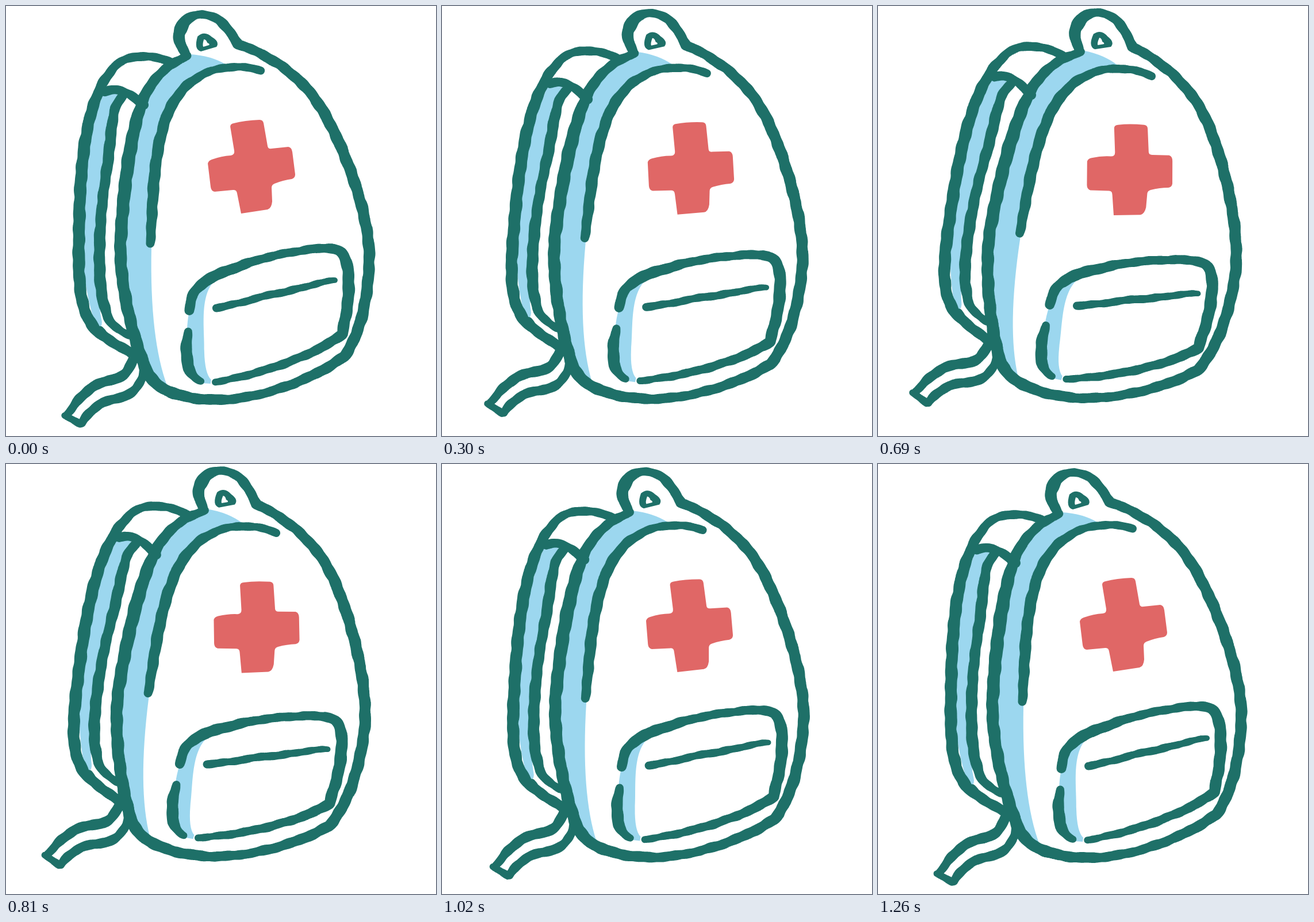
Write an HTML page with a canvas that moves like this. It is 748x748 px and loops after 1.29 s.

```html
<!DOCTYPE html>
<html lang="en">
<head>
<meta charset="utf-8">
<title>Swinging first-aid backpack</title>
<style>
  html, body { margin: 0; width: 100%; height: 100%; overflow: hidden; background: #fff; }
  canvas { display: block; }
</style>
</head>
<body>
<canvas id="stage" width="748" height="748"></canvas>
<script>
const ctx = document.getElementById('stage').getContext('2d');
const GREEN = '#1e7068', BLUE = '#9cd7ef', RED = '#e06766', WHITE = '#fff';
const LOOP = 1290, STEP = 30, SWING = 7.75 * Math.PI / 180;
const PIVOT_X = 386, PIVOT_Y = 370;

const ink = new Path2D();

// Inks a curve with a round brush; widths are spread evenly along it.
// Slow, unrelated waves in size and place give the hand-drawn edge.
function brush(curve, ...widths) {
  const line = document.createElementNS('http://www.w3.org/2000/svg', 'path');
  line.setAttribute('d', curve);
  const length = line.getTotalLength();
  for (let s = 0; s <= length; s += 1.2) {
    const at = s / length * (widths.length - 1);
    const i = Math.min(Math.floor(at), widths.length - 2);
    const width = widths[i] + (widths[i + 1] - widths[i]) * (at - i);
    const r = width / 2 + 0.4 * Math.sin(s * 0.13) * Math.sin(s * 0.031) + 0.3 * Math.sin(s * 0.29);
    const p = line.getPointAtLength(s);
    const x = p.x + 0.5 * Math.sin(s * 0.17), y = p.y + 0.5 * Math.cos(s * 0.11);
    ink.moveTo(x + r, y);
    ink.arc(x, y, r, 0, 2 * Math.PI);
  }
}

// Body, handle and front seam
brush(`M402,66 C450,82 500,112 535,158 S628,335 632,430 C632,500 618,570 588,610
  C540,645 450,684 370,685 C322,685 272,676 249,643 C228,600 198,500 199,415
  C203,340 212,240 235,172 C250,130 275,105 316,86`, 17, 20, 20, 20, 16, 21, 21, 23, 15);
brush('M312,82 C300,66 298,50 305,36 C313,20 328,15 342,15 C372,16 382,36 404,66', 16, 23, 14, 17, 18);
brush('M443,112 C370,92 300,122 275,205 C255,270 256,340 251,414', 14, 14, 19, 20, 20, 16);

// Shoulder strap
brush(`M286,97 C250,85 210,80 184,111 C140,165 128,265 127,400 C126,450 125,520 147,550
  C160,576 195,588 218,604`, 15, 15, 20, 21, 21, 21, 20, 17);
brush('M172,149 C195,138 225,158 240,173', 16, 15, 17);
brush('M203,156 C180,180 186,220 173,300 C162,370 157,480 172,525 C178,550 190,562 214,573',
  16, 20, 18, 20, 20, 13);
brush('M164,563 L172,574', 13, 13);

// Loose strap end
brush('M224,602 C215,650 195,645 163,657 C135,668 122,693 106,711', 18, 18, 18, 14);
brush('M239,632 C238,662 220,676 190,684 C160,690 150,700 131,727', 14, 17, 17, 15);
brush('M102,712 L130,728', 11, 14);

// Pocket
brush(`M319,529 C323,480 355,470 440,441 C490,428 528,422 560,421 C590,421 597,445 596,490
  C596,520 590,545 585,570 C545,605 440,642 364,654`, 17, 20, 15, 15, 21, 20, 16, 15, 12);
brush('M317,566 C309,610 317,648 340,653', 14, 21, 20, 12);
brush('M366,525 C410,518 430,508 475,499 C510,494 540,480 573,477', 14, 13, 14, 13, 10);

const sideShade = `M320,84 Q356,86 383,102 C285,125 257,210 253,422 Q250,580 281,662
  L250,645 C180,500 170,180 290,98 Z`;
const strapShade = `M168,155 Q180,148 194,154 C180,200 166,290 157,400 Q155,490 167,550
  Q167,562 158,558 C126,480 116,300 168,155 Z`;
const pocketShade = `M367,474 C335,500 346,560 345,600 Q346,640 357,650 L356,657 L340,656
  C308,620 304,520 345,476 Z`;
const ring = 'M333,53 Q345,42 358,54 Q372,62 366,71 L339,79 Q326,76 333,53 Z';
const ringHole = 'M344,58 Q348,58 350,64 Q355,66 353,68 L343,71 Q341,68 344,58 Z';
const cross = `M390,210 Q390,205 396,204 Q415,199 441,198 Q447,198 448,204 L455,244 Q456,249 462,248
  L491,245 Q497,246 498,254 L503,293 Q503,299 497,301 Q482,303 467,309 Q462,311 462,316
  L463,340 Q462,352 455,354 L409,361 L402,326 Q401,319 395,320 L363,323 Q357,322 356,315
  L351,274 Q352,269 358,267 Q375,261 391,260 Q398,259 397,252 Z`;

const layers = [
  [sideShade, BLUE], [strapShade, BLUE], [pocketShade, BLUE],
  [ink, GREEN], [ring, GREEN], [ringHole, WHITE], [cross, RED]
].map(([shape, color]) => [new Path2D(shape), color]);

function draw() {
  const time = Math.floor(performance.now() % LOOP / STEP) * STEP;
  const angle = SWING * (1 - Math.cos(2 * Math.PI * (time + STEP) / LOOP)) / 2;
  ctx.resetTransform();
  ctx.fillStyle = WHITE;
  ctx.fillRect(0, 0, 748, 748);
  ctx.translate(PIVOT_X, PIVOT_Y);
  ctx.rotate(angle);
  ctx.translate(-PIVOT_X, -PIVOT_Y);
  for (const [shape, color] of layers) {
    ctx.fillStyle = color;
    ctx.fill(shape);
  }
  requestAnimationFrame(draw);
}
draw();
</script>
</body>
</html>
```
